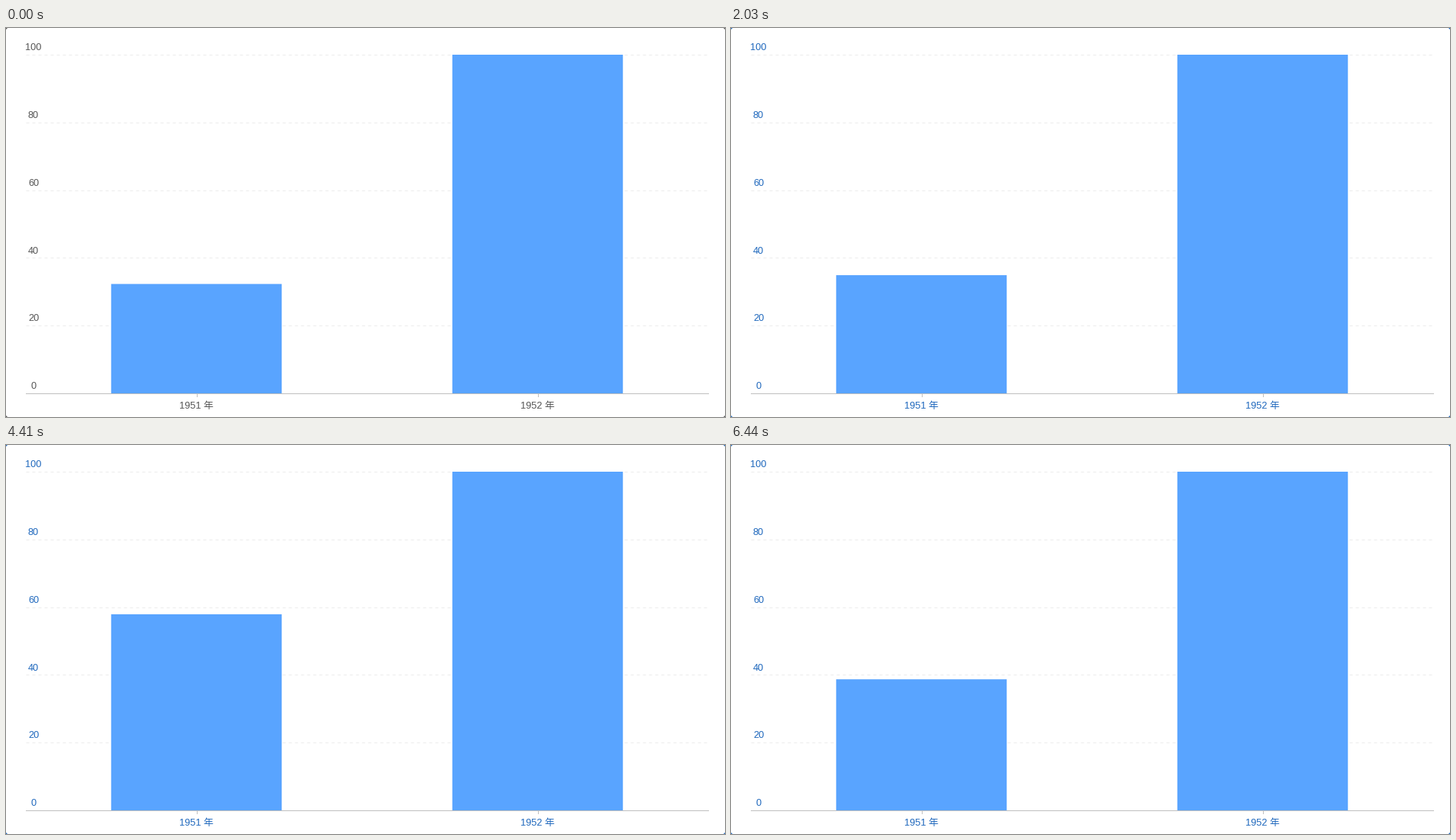
These frames come from a looping animation (942 px wide and 510 px high, 6.51 s). A matplotlib script:

```python
import numpy as np
import matplotlib.pyplot as plt
from matplotlib.animation import FuncAnimation
from matplotlib.patches import Polygon, Rectangle

W, H, DPI = 942, 510, 64
FRAMES, STEP = 93, 70
LEFT, RIGHT, BASE, TOP = 26, 920, 479, 35
BAND = (RIGHT - LEFT) / 2
BLUE, GREY, INK = "#59a4ff", "#555555", "#1f68bd"

plt.rcParams["font.family"] = ["Liberation Sans", "Noto Sans CJK JP"]
fig = plt.figure(figsize=(W / DPI, H / DPI), dpi=DPI, facecolor="white")
ax = fig.add_axes([0, 0, 1, 1])
ax.set_xlim(0, W)
ax.set_ylim(H, 0)
ax.axis("off")


def pt(px):
    return px * 72 / DPI


def y_of(value):
    return BASE - (BASE - TOP) * value / 100


def line(x0, y0, x1, y1, color, **kw):
    ax.plot([x0, x1], [y0, y1], color=color, lw=pt(1), zorder=1, **kw)


def label(x, y, text):
    return ax.text(x, y, text, ha="center", va="baseline",
                   fontsize=pt(12.8), color=GREY, zorder=4)


def add_bar(i, value):
    x = LEFT + BAND * (i + 0.25)
    bar = Rectangle((x, y_of(value)), BAND / 2, BASE - y_of(value),
                    fc=BLUE, ec="none", zorder=2, snap=False)
    return ax.add_patch(bar)


# (time in ms, value) knots of the moving bar
KNOTS = np.array([
    (0, 32.3), (950, 6), (1400, 13.9), (2730, 63.5), (3400, 88),
    (3780, 82.9), (4410, 57.9), (5460, 23.6), (5750, 21), (6440, 38.7),
])
T, V = KNOTS.T
SLOPE = np.gradient(V, T)


def value_at(t):
    """Smooth cubic path through the knots."""
    k = min(np.searchsorted(T, t, side="right") - 1, len(T) - 2)
    h = T[k + 1] - T[k]
    u = (t - T[k]) / h
    rise = u * u * (3 - 2 * u)
    return (V[k] * (1 - rise) + V[k + 1] * rise
            + h * SLOPE[k] * u * (1 - u) ** 2
            - h * SLOPE[k + 1] * u * u * (1 - u))


texts = []
for v in range(0, 101, 20):
    y = y_of(v)
    if v:
        line(LEFT, y, RIGHT, y, "#ececec", linestyle=(0, (4, 4)),
             dash_capstyle="butt")
    texts.append(label(36, y - 5.8, str(v)))
line(LEFT, BASE, RIGHT, BASE, "#bfbfbf")

for i, year in enumerate((1951, 1952)):
    x = LEFT + BAND * (i + 0.5)
    line(x, BASE, x, BASE + 4, "#bfbfbf")
    texts.append(label(x, 499.3, f"{year} 年"))

bar = add_bar(0, V[0])
add_bar(1, 100)

# window corners
corners = []
for cx, dx in ((0, 1), (W, -1)):
    for cy, dy in ((0, 1), (H, -1)):
        tri = Polygon([(cx, cy), (cx + 2 * dx, cy), (cx, cy + 2 * dy)],
                      fc=GREY, ec="none")
        corners.append(ax.add_patch(tri))


def draw(i):
    v = value_at(i * STEP)
    bar.set_y(y_of(v))
    bar.set_height(BASE - y_of(v))
    ink = INK if v > 34 else GREY
    for t in texts:
        t.set_color(ink)
    for c in corners:
        c.set_facecolor(ink)
    return [bar, *texts, *corners]


anim = FuncAnimation(fig, draw, frames=FRAMES, interval=STEP,
                     repeat=True, repeat_delay=0, blit=False)
plt.show()
```
